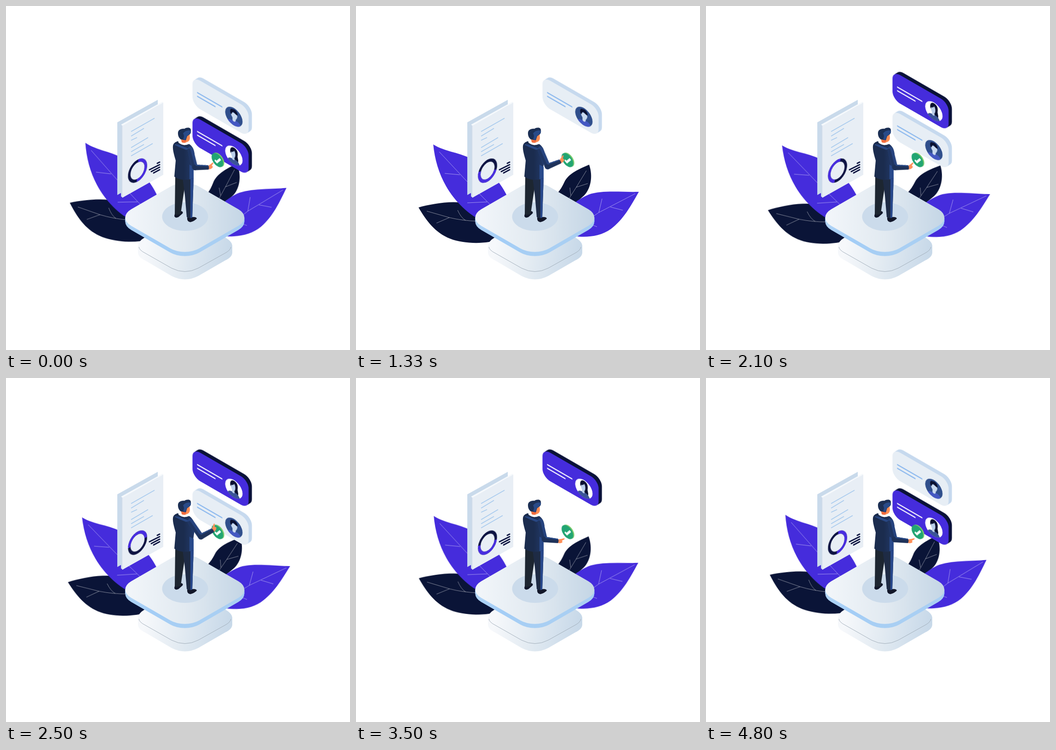
An HTML page without scripts that plays this animation: 748 px wide and 748 px high, repeating every 5.01 s.

```html
<!DOCTYPE html>
<html lang="en">
<head>
<meta charset="utf-8">
<title>Choosing a profile</title>
<style>
  html, body { margin: 0; width: 100%; height: 100%; overflow: hidden; background: #fff; }
  svg { display: block; width: 100vw; height: 100vh; }
  .leaf, .card, .joint, .spin { animation: 5010ms linear infinite; }

  /* Leaves sway from angle --a to --b and back */
  .leaf { animation-name: sway; animation-timing-function: cubic-bezier(.37, 0, .63, 1); }
  @keyframes sway {
    0%, 91.8%, 100% { transform: rotate(var(--a)); }
    45.9% { transform: rotate(var(--b)); }
  }
  .vein { fill: none; stroke: #fff; stroke-opacity: .5; stroke-width: 1; }

  .spin { animation-name: spin; }
  @keyframes spin {
    0% { transform: rotate(5deg); }
    26.5% { transform: rotate(110deg); }
    41.9% { transform: rotate(200deg); }
    59.9% { transform: rotate(350deg); }
    69.9% { transform: rotate(460deg); }
    83.8% { transform: rotate(635deg); }
    95.8%, 100% { transform: rotate(725deg); }
  }

  /* Cards: drop in, wait, drop to the lower slot, get swiped away */
  .light { animation-name: light-move, light-fade; }
  .dark { animation-name: dark-move, dark-fade; }
  @keyframes light-move {
    0% { transform: none; }
    35.33% { transform: none; animation-timing-function: ease; }
    47.1% { transform: translate(0, 84.5px); }
    62.9% { transform: translate(0, 84.5px); animation-timing-function: ease-in; }
    68.3% { transform: translate(65px, 122px); }
    68.4% { transform: translate(0, -84.5px); }
    77.25% { transform: translate(0, -84.5px); animation-timing-function: ease; }
    89%, 100% { transform: none; }
  }
  @keyframes light-fade {
    0%, 62.9% { opacity: 1; }
    68.3%, 79.4% { opacity: 0; }
    83%, 100% { opacity: 1; }
  }
  @keyframes dark-move {
    0% { transform: translate(0, 84.5px); }
    19.96% { transform: translate(0, 84.5px); animation-timing-function: ease-in; }
    25.95% { transform: translate(65px, 122px); }
    26% { transform: translate(0, -84.5px); }
    35.33% { transform: translate(0, -84.5px); animation-timing-function: ease; }
    47.1% { transform: none; }
    77.25% { transform: none; animation-timing-function: ease; }
    89%, 100% { transform: translate(0, 84.5px); }
  }
  @keyframes dark-fade {
    0%, 19.96% { opacity: 1; }
    25.95%, 37.5% { opacity: 0; }
    41.1%, 100% { opacity: 1; }
  }

  /* Arm: ready, raised, coming down, rest */
  .joint { animation-timing-function: ease-in-out; }
  .shoulder { transform-origin: 401px 312px; animation-name: shoulder; }
  .elbow { transform-origin: 410px 351px; animation-name: elbow; }
  .wrist { transform-origin: 440px 355px; animation-name: wrist; }
  @keyframes shoulder {
    0%, 41.9% { transform: rotate(-1deg); }
    15%, 19%, 56.9%, 61.5% { transform: rotate(-38deg); }
    26.55%, 67.9% { transform: rotate(-10deg); }
    29.1%, 39.9%, 69.7%, 100% { transform: none; }
  }
  @keyframes elbow {
    0%, 41.9% { transform: rotate(-5deg); }
    15%, 19%, 56.9%, 61.5% { transform: rotate(-19deg); }
    26.55%, 67.9% { transform: rotate(-18deg); }
    29.1%, 39.9%, 69.7%, 100% { transform: none; }
  }
  @keyframes wrist {
    0%, 41.9% { transform: rotate(-20deg); }
    15%, 19%, 56.9%, 61.5% { transform: rotate(-28deg); }
    26.55%, 67.9% { transform: rotate(-17deg); }
    29.1%, 39.9%, 69.7%, 100% { transform: none; }
  }
</style>
</head>
<body>
<svg viewBox="0 0 748 748" xmlns="http://www.w3.org/2000/svg">
  <defs>
    <linearGradient id="top" x1="0" y1="1" x2="1" y2="0">
      <stop offset=".1" stop-color="#f1f5f9"/><stop offset=".5" stop-color="#e2eaf1"/><stop offset=".95" stop-color="#c3d5e5"/>
    </linearGradient>
    <linearGradient id="base" gradientUnits="userSpaceOnUse" x1="300" y1="530" x2="480" y2="560">
      <stop offset="0" stop-color="#f6f8fb"/><stop offset=".45" stop-color="#e3ebf2"/><stop offset="1" stop-color="#c8d9e9"/>
    </linearGradient>
    <linearGradient id="band">
      <stop offset="0" stop-color="#b4d6f8"/><stop offset=".5" stop-color="#a3cdf6"/><stop offset="1" stop-color="#a9cff3"/>
    </linearGradient>
    <linearGradient id="suit">
      <stop offset=".5" stop-color="#1b2c4e"/><stop offset="1" stop-color="#223a6b"/>
    </linearGradient>
    <rect id="slab" x="-85.3" y="-85.3" width="170.6" height="170.6" rx="36"/>
    <rect id="face" width="122" height="62" rx="17"/>
    <g id="depth">
      <use href="#face" x="1.8" y="-2.2"/><use href="#face" x="3.6" y="-4.4"/>
      <use href="#face" x="5.4" y="-6.6"/><use href="#face" x="7.2" y="-8.8"/>
    </g>
    <path id="rows" d="M11 29.5H64M11 37.5H49" fill="none" stroke-width="2.5" stroke-linecap="round"/>
    <clipPath id="disc"><circle r="19"/></clipPath>
  </defs>

  <!-- Leaves -->
  <g class="leaf" style="--a:3.35deg;--b:-2.05deg;transform-origin:310px 480px">
    <path fill="#0a1437" d="M136 438C165 430 215 421 245 431C270 440 290 455 312 470L314 507C285 518 235 518 205 506C172 493 153 467 136 438Z"/>
    <path class="vein" d="M154 446L203 460Q232 467 265 468M175 472L203 460M221 444Q228 460 238 466"/>
  </g>
  <g class="leaf" style="--a:1.68deg;--b:-1.03deg;transform-origin:290px 455px">
    <path fill="#452cdc" d="M168 301C195 318 228 318 255 335C290 356 312 380 328 412L280 470C245 455 215 425 196 392C180 364 171 333 168 301Z"/>
    <path class="vein" d="M181 317L239 379L292 432M193 364L226 367M242 428L285 426"/>
  </g>
  <g class="leaf" style="--a:-3.7deg;--b:2.2deg;transform-origin:465px 420px">
    <path fill="#0a1437" d="M507 345C486 354 462 364 453 383C449 392 444 400 437 408L470 435L496 412C510 398 516 371 507 345Z"/>
    <path class="vein" d="M460 424L479 394L501 358M467 412L465 395M479 394L504 386"/>
  </g>
  <g class="leaf" style="--a:-3.66deg;--b:2.25deg;transform-origin:480px 480px">
    <path fill="#452cdc" d="M615 404C575 405 535 400 506 410C494 415 484 421 474 429L470 500C500 504 530 502 554 485C582 464 598 434 615 404Z"/>
    <path class="vein" d="M490 475L528 449L607 408M528 449L535 419M553 437L580 444M508 474L524 480"/>
  </g>

  <!-- Platform -->
  <path fill="url(#base)" d="M287 522Q287 512 302 503L365 466Q389 453 413 466L476 503Q492 512 492 522V536Q492 546 477 553L418 587Q389 602 360 587L302 553Q287 546 287 536Z"/>
  <path fill="none" stroke="#a3afbb" d="M289 524Q290 531 302 537L360 570Q389 585 418 570L477 537Q488 531 489 524"/>
  <g fill="url(#band)">
    <path fill="#a5cef6" d="M259 460H518.5V469H259Z"/>
    <use href="#slab" transform="matrix(.866 .5 -.866 .5 388.8 469)"/>
  </g>
  <use href="#slab" fill="url(#top)" transform="matrix(.866 .5 -.866 .5 388.8 460)"/>
  <ellipse cx="389.500" cy="458" rx="50" ry="31" fill="#cbdbeb"/>

  <!-- Report -->
  <path fill="#c9daeb" d="M242 253L330 204V362L242 411Z"/>
  <path fill="#f6f9fc" d="M250 258L340 208L342 210L254 261Z"/>
  <path fill="#cddaea" d="M250 258L254 261V417L250 414Z"/>
  <path fill="#e8eef5" d="M253 260.500L342 210V367L253 417Z"/>
  <path fill="none" stroke="#a9cbee" stroke-width="1.8" d="M272 273L323 244M272 283L300 266M272 292L285 286M272 308L309 286M272 317L300 301M272 326L319 299"/>
  <path fill="none" stroke="#0d1440" stroke-width="3" stroke-linecap="round" d="M329 342L334 339.500M312 356L334 345M316 360L334 350.500M321 363L334 356"/>
  <g transform="matrix(1 -.56 0 1.15 286 358)" fill="none" stroke-width="5.500">
    <g class="spin">
      <circle r="18" stroke="#0d1342"/>
      <path d="M0 -18A18 18 0 0 1 0 18" stroke="#482de0"/>
    </g>
  </g>

  <!-- Cards -->
  <g class="card dark">
    <g transform="matrix(1 .577 0 1 405.500 152.800)">
      <use href="#depth" fill="#0a1238"/>
      <use href="#face" fill="#452cdc"/>
      <use href="#rows" stroke="#fff"/>
      <g transform="translate(90 36)" clip-path="url(#disc)">
        <circle r="19" fill="#fff"/>
        <path fill="#0a1030" d="M-8 -4C-9 -14 -3 -18 2 -17C9 -16 9 -8 8 -2C9 4 11 7 8 12L1 8Z"/>
        <path fill="#3a5496" d="M-15 20C-14 10 -8 8 -2 8C5 7 12 6 14 20Z"/>
        <path fill="#bccfe9" d="M-6 -5Q-2 -6 1 -11Q4 -7 3 0Q2 4 1 5L2 8Q-1 12 -4 9V4Q-7 1 -6 -5Z"/>
      </g>
    </g>
  </g>
  <g class="card light">
    <g transform="matrix(1 .577 0 1 405.500 152.800)">
      <use href="#depth" fill="#c6d9ee"/>
      <use href="#face" fill="#e7eef5"/>
      <use href="#rows" stroke="#86b5ee"/>
      <g transform="translate(90 36)" clip-path="url(#disc)">
        <circle r="19" fill="#304f8c"/>
        <path fill="#4458c2" d="M-16 22C-15 12 -10 10 -3 9L5 7C12 6 15 10 16 22Z"/>
        <path fill="#c9d9ee" d="M-6 -7L6 -10Q9 -4 6 1Q5 4 4 4V7Q1 13 -3 9V3Q-7 0 -6 -7Z"/>
        <path fill="#0a1030" d="M-7 -3C-10 -10 -7 -15 -2 -15C3 -18 9 -14 8 -7Q3 -6 -1 -10Q-4 -8 -5 -3Z"/>
      </g>
    </g>
  </g>

  <!-- Confirm button -->
  <g transform="matrix(1 .577 0 1.060 459.700 335)">
    <circle cx="2.300" cy="-2" r="12.700" fill="#7ccb6c"/>
    <circle r="12.700" fill="#22a573"/>
    <path d="M-5.500 3L-1.500 5L6.500 -5.500" fill="none" stroke="#fff" stroke-width="4"/>
  </g>

  <!-- Man -->
  <g>
    <path fill="#12172a" d="M367 452L381 446Q386 447 384 451L375 459Q368 462 366 457ZM394 460L405 459Q413 458 415 462Q411 467 401 470Q393 469 394 460Z"/>
    <path fill="#1d2631" d="M368 370L392 374L386 410L380 451Q374 456 367 453Z"/>
    <path fill="#1e2b45" d="M384 374H408L405 460Q399 463 393 459L389 412Z"/>
    <path fill="#28488b" d="M401 376L408 374L405 460L401 461Z"/>
    <path fill="url(#suit)" d="M374 294C380 301 390 304 398 300C406 305 411 314 410 330L407 352L408 374C397 380 376 379 366 371L369 336C366 325 362 313 363 304C364 298 369 295 374 294Z"/>
    <path fill="#284783" d="M365 301Q375 300 382 304L398 310L392 313L377 307Z"/>
    <path fill="#294a8b" d="M399 345L408 350V374L399 377Z"/>
    <path fill="#fff" d="M375 295L381 291L398 293L397 300Q386 306 375 297Z"/>
    <path fill="#ff8d55" d="M390 280L399 277L400 287Q399 295 393 296Q387 299 382 296L380 289Z"/>
    <path fill="#f06c40" d="M383 291L392 292L390 297Q386 298 382 296Z"/>
    <path fill="#1c2f54" d="M374 278C373 270 380 266 388 267C394 263 402 264 402 270C403 275 401 279 398 280L394 283L391 292L380 290C376 287 374 282 374 278Z"/>
    <path fill="#294a88" d="M385 277Q391 269 402 271Q402 278 398 280L394 282L390 292L385 289Q389 283 385 277Z"/>

    <g class="joint shoulder">
      <path d="M401 312L410 351" stroke="#26437e" stroke-width="12.500" stroke-linecap="round"/>
      <path d="M398 313L407 349" stroke="#1f3561" stroke-width="6" stroke-linecap="round"/>
      <g class="joint elbow">
        <g class="joint wrist">
          <path fill="#ff9059" d="M438 351L446 350L452 348.500Q455 349 453 351L448 353.500L449 357Q445 361 438 358Z"/>
        </g>
        <path fill="#1e3259" d="M410 345L439 349.500Q442 354 439 359L410 357.300C402 356 402 345 410 345Z"/>
        <path fill="#294a88" d="M411 345L439 349.500L440 352L413 348Z"/>
      </g>
    </g>
  </g>
</svg>
</body>
</html>
```
